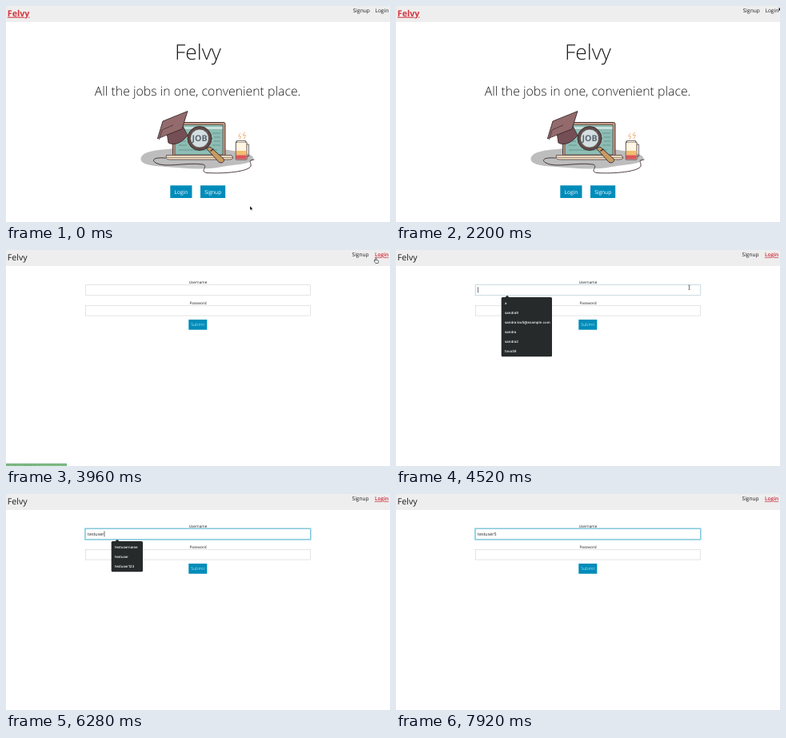
Write an HTML page that moves like this. It is 480 px wide and 270 px high and loops after 8 s.

```html
<!DOCTYPE html>
<html lang="en">
<head>
<meta charset="utf-8">
<title>Job board login</title>
<style>
  html, body { margin: 0; width: 100%; height: 100%; overflow: hidden; background: #fff; }
  svg { display: block; width: 480px; height: 270px; }
  text { font-family: "Open Sans", sans-serif; fill: #1c1c1c; text-rendering: geometricPrecision; }
  .mid { text-anchor: middle; }
  .end { text-anchor: end; }
  .light { font-weight: 300; }
  .nav { font-size: 6.6px; }
  .brand { font-size: 10.7px; }
  .on { font-weight: 600; fill: #cb2436; text-decoration: underline; }
  .brand.on { font-weight: 700; fill: #d2353f; }
  .btn rect { fill: #008cba; }
  .btn text { fill: #fff; }
  .label { font-size: 4.7px; }
  .field { fill: #fff; stroke: #cacaca; stroke-width: .5; }
  .menu text { font: 500 4.36px Inter, sans-serif; fill: #fff; }
  .ink { stroke: #3b2a2c; stroke-width: .9; stroke-linejoin: round; stroke-linecap: round; }
</style>
</head>
<body>
<svg viewBox="0 0 480 270">
  <rect width="480" height="20" fill="#eee"/>
  <text id="brand" class="brand" x="1.8" y="12.7">Felvy</text>
  <text id="signup" class="nav end" y="8.4">Signup</text>
  <text id="login" class="nav end" x="478.2" y="8.4">Login</text>

  <g id="home">
    <text class="mid light" x="240" y="67" font-size="26.4">Felvy</text>
    <text class="mid light" x="239.600" y="112" font-size="15.84">All the jobs in one, convenient place.</text>

    <path d="M168.500 191C169 183 184 180 202 179C230 175 270 178 290 182C304 184 311 188 309 192C304 198 286 198 270 201C244 206 220 202 200 201C182 200 168.500 198 168.500 191Z" fill="#bdbdbd"/>
    <path d="M199 190C186 189 181 192 187 196C199 203 224 195 246 198C254 200 241 207 251 208.500C272 210 304 207 306 200C307 195 301 193 310 192" class="ink" fill="none"/>

    <g class="ink">
      <rect x="208.500" y="145.500" width="65.500" height="42" rx="2" fill="#c69a83"/>
      <rect x="211.500" y="148.500" width="59.500" height="37.500" fill="#8dbdb4" stroke-width=".6"/>
      <path d="M201 186.500H282L284 190C283 191.500 281 192 278 192H206C202 192 200 191 200 190Z" fill="#f3dfc3" stroke-width=".7"/>
      <path d="M200.500 189.300H283.500" stroke-width=".5"/>
    </g>
    <path d="M212 152.500H270.500" stroke="#e0eeea" stroke-width="2"/>
    <path d="M216 159H226M216 164H225M216 169H225M216 174H226M258 159H268M260 164H268M260 169H268M258 174H268M216 180H264" stroke="#5d8e88" stroke-width=".8"/>

    <g class="ink">
      <path d="M201 158L203 171C211 175 219 171 227 162L221 150Z" fill="#754f55"/>
      <path d="M189.500 165.500L196 144L227 131.500L220 153.500Z" fill="#936b6d"/>
      <path d="M208.500 149L195 155L191.500 167" fill="none" stroke-width=".7"/>
    </g>

    <g class="ink">
      <path d="M251 178L255 176L272 191C274 194 270 198 266 195Z" fill="#c79b62"/>
      <path d="M256 181L259 179" stroke-width="1.500"/>
      <circle cx="242" cy="165.500" r="15" fill="#614c48"/>
      <circle cx="242" cy="165.500" r="11.500" fill="#d3dfe1" stroke-width=".6"/>
    </g>
    <text class="mid" x="242" y="169.300" font-size="10.6" font-weight="700" font-stretch="75%" style="fill:#5c6671">JOB</text>

    <g class="ink">
      <path d="M301 173H303.500V188H301" fill="none" stroke-width=".7"/>
      <rect x="287.300" y="170" width="13.700" height="22" rx=".5" fill="#fff6e3" stroke-width=".8"/>
      <path d="M287.800 181H300.500V187H287.800Z" fill="#f3bd70" stroke="none"/>
      <path d="M287.800 186.500H300.500V191.500H287.800Z" fill="#dd555c" stroke="none"/>
      <path d="M288.500 170V168.500H299.500V170" fill="#fff6e3" stroke-width=".7"/>
    </g>
    <path d="M293 159L290.500 163H293.500L292 167M298.500 157.500L296 161.500H299.500L297.500 166" fill="none" stroke="#eaa163" stroke-width=".8"/>

    <g class="btn" font-size="6.6">
      <rect x="205.300" y="224.300" width="27.200" height="15.700"/>
      <text class="mid" x="218.900" y="234.600">Login</text>
      <rect x="243" y="224.300" width="31.200" height="15.700"/>
      <text class="mid" x="258.700" y="234.600">Signup</text>
    </g>
  </g>

  <g id="form">
    <text class="label mid" x="240" y="42">Username</text>
    <text class="label mid" x="240" y="67.600">Password</text>
    <rect id="glow" x="98.500" y="43" width="282.500" height="14.300" rx=".5" fill="none" stroke="#a6dbea" stroke-width="1.600"/>
    <rect id="user" class="field" x="99.250" y="43.750" width="281" height="12.800"/>
    <rect class="field" x="99.250" y="69.250" width="281" height="12.800"/>
    <text id="typed" x="102" y="52" font-size="5.36"></text>
    <rect id="caret" y="46.300" width=".6" height="7.200" fill="#111"/>
    <g class="btn" font-size="5.36">
      <rect x="228.300" y="87" width="23" height="12.700"/>
      <text class="mid light" x="239.800" y="95.300">Submit</text>
    </g>
    <g id="menu" class="menu">
      <path d="M136 59.500L139 56.800L142 59.500Z" fill="#262a2b"/>
      <rect id="panel" x="131.700" y="59" rx="1.500" fill="#262a2b"/>
      <g id="items"></g>
    </g>
  </g>

  <g id="status">
    <rect y="267" width="76" height="4" fill="#7dbb83"/>
    <path d="M0 267.200H76" stroke="#5f9766" stroke-width=".5"/>
    <text x="2" y="272.500" font-size="4.6" style="fill:#23502b">localhost:3000/login</text>
  </g>

  <g id="pointer">
    <path id="arrow" d="M0 0V5L1.200 4L2 5.700L2.800 5.300L2 3.700H3.500Z" fill="#000" stroke="#fff" stroke-width=".3"/>
    <path id="hand" d="M-.6 0Q0-.6.600 0V2.200L2.800 2.800Q3.400 3 3.200 4L2.600 6H-.5L-2.200 3.500Q-2-.1-.600 3Z" fill="#fff" stroke="#111" stroke-width=".6"/>
    <path id="beam" d="M-1-2.700Q0-2.700 0-2Q0-2.700 1-2.700M0-2V2M-1 2.700Q0 2.700 0 2Q0 2.700 1 2.700" fill="none" stroke="#222" stroke-width=".6"/>
  </g>
</svg>
<script>
const LOOP = 8000, SWITCH = 3640, FOCUS = 4480;
const $ = id => document.getElementById(id);
const show = (id, on) => { $(id).style.display = on ? "" : "none"; };
const clamp = v => Math.min(1, Math.max(0, v));
const ease = v => v * v * (3 - 2 * v);
const between = (t, a, b) => t >= a && t < b;

// time, x, y
const path = [
  [0, 305, 250], [880, 305, 250], [1200, 361, 167], [1840, 361, 167],
  [2200, 478.5, 1.5], [2320, 484, -6], [3120, 484, 4], [3400, 470, 7.2],
  [3560, 470, 7.2], [3720, 462.5, 10.5], [3960, 462.5, 10.5], [4360, 366.5, 46.8]
];

const typing = [
  [0, ""], [5160, "t"], [5280, "te"], [5360, "tes"], [5560, "test"],
  [5880, "testu"], [6000, "testus"], [6120, "testuse"], [6240, "testuser"],
  [6720, "testuser5"], [7200, "testuser"], [7440, "testuser5"]
];

const saved = ["a", "sandra9", "sandra.kw5@example.com", "sandra", "sandra2", "tova36"];
const matches = ["testusername", "testuser", "testuser123"];

// time, entries, panel width
const menus = [
  [0, [], 0], [FOCUS, saved, 63.3], [5160, [...matches, "test"], 39.3], [5880, matches, 39.3],
  [6720, [], 0], [7200, matches, 39.3], [7440, [], 0]
];

const last = (steps, t) => steps.filter(s => s[0] <= t).pop();

function pointAt(t) {
  const i = path.findIndex(p => p[0] > t);
  if (i < 0) return path[path.length - 1].slice(1);
  const [a, x, y] = path[i - 1], [b, u, v] = path[i];
  const k = ease((t - a) / (b - a));
  return [x + (u - x) * k, y + (v - y) * k];
}

let openMenu;
function setMenu(step) {
  if (step === openMenu) return;
  openMenu = step;
  const [, names, width] = step;
  show("menu", names.length);
  $("panel").setAttribute("width", width);
  $("panel").setAttribute("height", 2.3 + 12 * names.length);
  $("items").replaceChildren(...names.map((name, i) => {
    const el = document.createElementNS("http://www.w3.org/2000/svg", "text");
    el.setAttribute("x", 136);
    el.setAttribute("y", 68 + 12 * i);
    el.textContent = name;
    return el;
  }));
}

function drawForm(t) {
  const focus = clamp((t - FOCUS) / 200);
  $("glow").style.opacity = focus;
  $("user").style.stroke = `color-mix(in srgb, #cacaca, #3da5c4 ${focus * 100}%)`;

  const [since, text] = last(typing, t);
  $("typed").textContent = text;
  $("caret").setAttribute("x", 102.3 + (text ? $("typed").getComputedTextLength() : 0));
  const blinkFrom = Math.max(since, FOCUS + 20);
  show("caret", t >= FOCUS && Math.floor(Math.max(0, t - blinkFrom + 20) / 500) % 2 === 0);
  setMenu(last(menus, t));
}

function draw(t) {
  const onForm = t >= SWITCH, hot = t >= 3280;
  show("home", !onForm);
  show("form", onForm);
  show("status", between(t, 3680, 4120));
  $("brand").classList.toggle("on", !onForm);
  $("login").classList.toggle("on", hot);
  $("signup").setAttribute("x", hot ? 453.6 : 454.8);

  const [x, y] = pointAt(t);
  $("pointer").setAttribute("transform", `translate(${x} ${y})`);
  show("pointer", t < 5160);
  const overLink = between(t, 3280, 4040), overField = t >= 4320;
  show("hand", overLink);
  show("beam", overField);
  show("arrow", !overLink && !overField);
  drawForm(t);
}

function tick() {
  draw(performance.now() % LOOP);
  requestAnimationFrame(tick);
}
tick();
</script>
</body>
</html>
```
